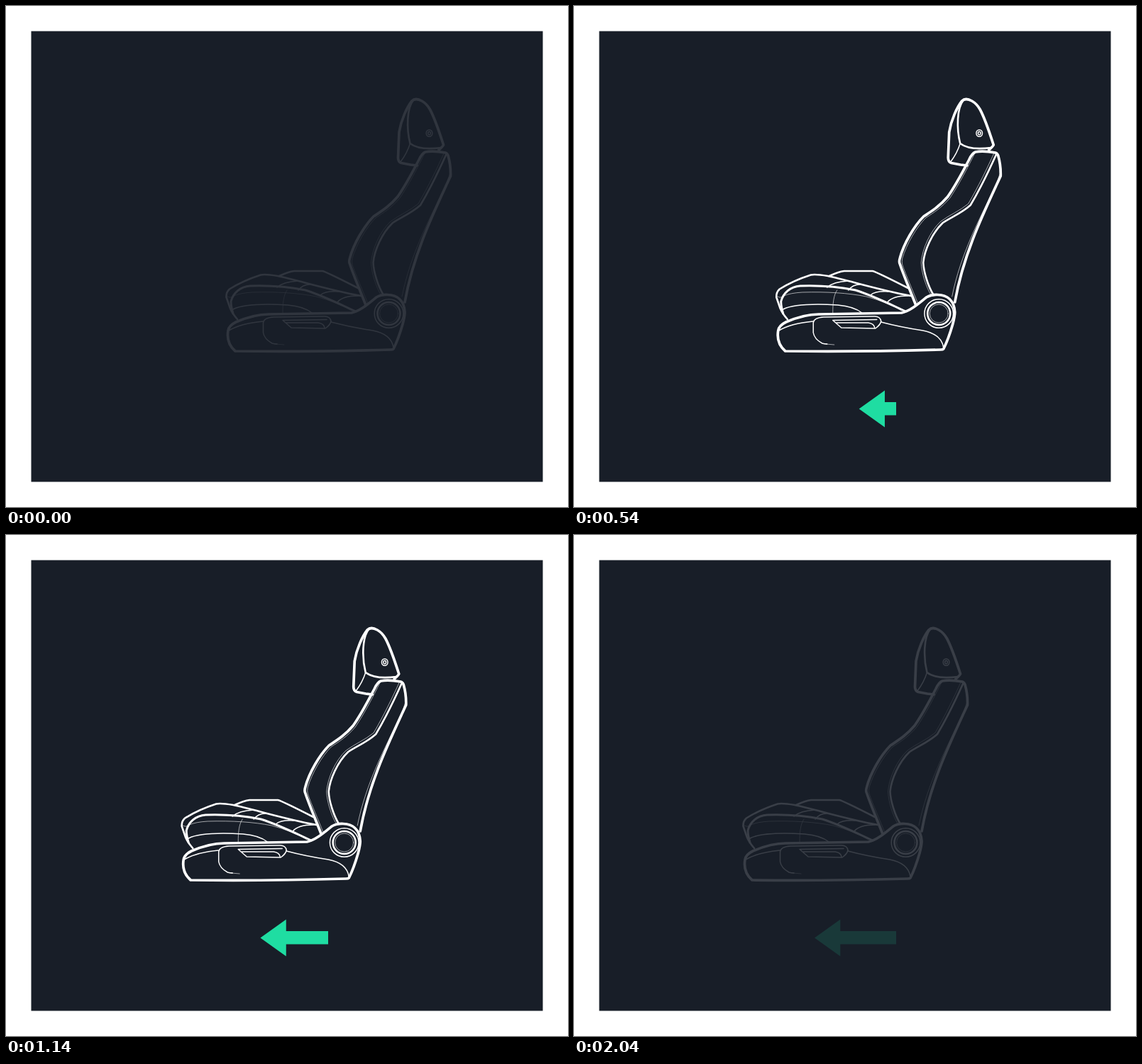
Animation of 792 by 707 pixels, one loop 2100 ms. Source, as an HTML page:

```html
<!DOCTYPE html>
<html lang="en">
<head>
<meta charset="utf-8">
<title>Seat sliding forward</title>
<style>
  html, body { margin: 0; width: 100%; height: 100%; overflow: hidden; background: #fff; }
  svg { display: block; }
  #seat { fill: none; stroke: #fff; stroke-linecap: round; stroke-linejoin: round; }
  .bold { stroke-width: 3.7; }
  .mid { stroke-width: 2.6; }
  .fine { stroke-width: 1.5; }
  .hair { stroke-width: .8; stroke-opacity: .75; }
</style>
</head>
<body>
<svg width="792" height="707" viewBox="0 0 792 707">
  <rect x="35.5" y="35.5" width="721" height="636" fill="#181e28"/>
  <g id="seat">
    <!-- headrest -->
    <g class="bold">
      <path d="M507 225L498 224L485 221.500Q480.500 220 480.500 214L482 178C485 160 493 143 500 134Q505 129 514 134Q521 138 525.500 146C533 160 540 182 544.500 196Q543 199 538 203"/>
    </g>
    <path class="mid" d="M502 133C493 144 492 172 497.500 194C508 202 526 202 541 200"/>
    <path class="fine" d="M497.500 194C495 202 490 212 484 220"/>
    <ellipse class="fine" cx="524.500" cy="179.500" rx="4.300" ry="4.800"/>
    <ellipse class="fine" cx="524.500" cy="179.500" rx="1.800" ry="2.300"/>

    <!-- backrest -->
    <path class="bold" d="M435 422C428 404 417 378 412.500 364Q411 361 412.500 356C418 335 433 310 446 297C458 289 468 283 480 269C492 252 502 232 510 217Q514 208 519 206Q530 204 547 207Q550 208 551 211Q555 225 554.500 240C530 293 502 350 490 418"/>
    <path class="hair" d="M438 420C431 402 421 380 416 365Q415 361 416 356C422 336 436 312 449 299C461 291 471 285 483 271C497 250 508 228 518 208"/>
    <path class="mid" d="M549 208C540 228 527 256 512 281C500 292 485 298 473 306C458 320 447 345 445.500 362C446 375 452 395 460 408"/>
    <path class="hair" d="M545 208C536 228 523 255 509 279C497 289 482 295 470 304C455 318 444 343 442.500 362C443 376 449 396 457 409"/>
    <path class="hair" d="M553 238Q551 246 546 257C525 300 498 350 486 410"/>

    <!-- cushion -->
    <path class="mid" d="M313 381Q326 375 334 374H374Q379 375 424 398"/>
    <path class="mid" d="M254 442Q247 434 244 427L238.500 411Q238 404 243 399.500C255 392 270 385 287 379.500Q293 378 311 381C340 387 380 400 428 409"/>
    <path class="bold" style="stroke-width:3" d="M248 434Q245 424 245 417C248 405 258 396 272 395C300 394 330 397 350 401C378 410 405 424 421 431"/>
    <path class="fine" d="M310 397Q319 389 340 388M340 401Q346 393 356 393M371 408Q378 402 396 403M395 418Q402 409 424 409"/>
    <path class="hair" d="M238 408Q243 414 249 409Q258 405 275 404C310 403 340 405 365 410Q395 418 415 430M324 401C319 408 318 420 318 433"/>
    <path class="fine" d="M248 428C262 421 290 420 325 422Q348 424 359 433"/>

    <!-- base -->
    <path class="bold" d="M251 487C243 480 239 470 241 458C242 452 246 449 252 446C266 440 280 435 298 435L415 433C428 430 440 419 450 411Q457 407 466 407.500C479 408 489 415 490 432Q490 438 487 449Q481 470 474 484Q473 485 470 485C400 487 320 488 251 487Z"/>
    <circle class="fine" cx="467.500" cy="434" r="20.300"/>
    <circle class="mid" cx="467.500" cy="434" r="16"/>
    <circle class="hair" cx="467.500" cy="434" r="13"/>
    <path class="fine" d="M242 458C252 452 270 447 290 445M386 446C405 451 425 455 445 458Q471 463 474 482"/>
    <path class="fine" d="M386 445Q385 438 377 438L305 439Q291 440 290.500 447V461Q292 470 303 476Q306 477 310 477"/>
    <path class="hair" d="M308 477L320 478"/>
    <path class="fine" d="M380 442.500L318 443.500L330 454L378 455Q385 450 386 445M323 447H368Q376 448 377 454"/>
  </g>
  <path id="arrow" fill="#1fdda2"/>
</svg>
<script>
const seat = document.getElementById('seat');
const arrow = document.getElementById('arrow');
const LOOP = 2100, STEP = 30, SLIDE = 1410, EASE = 0.22;

const ramp = (t, from, to) => Math.min(1, Math.max(0, (t - from) / (to - from)));

// cubic-bezier(EASE, 0, 1 - EASE, 1), solved by bisection
function ease(x) {
  let lo = 0, hi = 1, s = x;
  for (let i = 0; i < 24; i++) {
    s = (lo + hi) / 2;
    const bx = 3 * EASE * s * (1 - s) ** 2 + 3 * (1 - EASE) * s * s * (1 - s) + s ** 3;
    if (bx < x) lo = s; else hi = s;
  }
  return s * s * (3 - 2 * s);
}

function draw(t) {
  const fadeOut = 1 - ramp(t, 1680, LOOP);
  const dx = 72 * (1 - ease(ramp(t, 0, SLIDE)));
  seat.setAttribute('transform', `translate(${dx} 0)`);
  seat.setAttribute('opacity', ramp(t, -30, 270) * fadeOut);

  const tip = 406 - 67 * ramp(t, 480, SLIDE), neck = tip + 36.3;
  arrow.setAttribute('d', `M${tip} 568.5L${neck} 542.5V559H454V577.500H${neck}V594.500Z`);
  arrow.setAttribute('opacity', ramp(t, 60, 480) * fadeOut);
}

const start = performance.now();
function tick() {
  const t = (performance.now() - start) % LOOP;
  draw(Math.min(2040, Math.floor(t / STEP) * STEP));
  requestAnimationFrame(tick);
}
tick();
</script>
</body>
</html>
```
